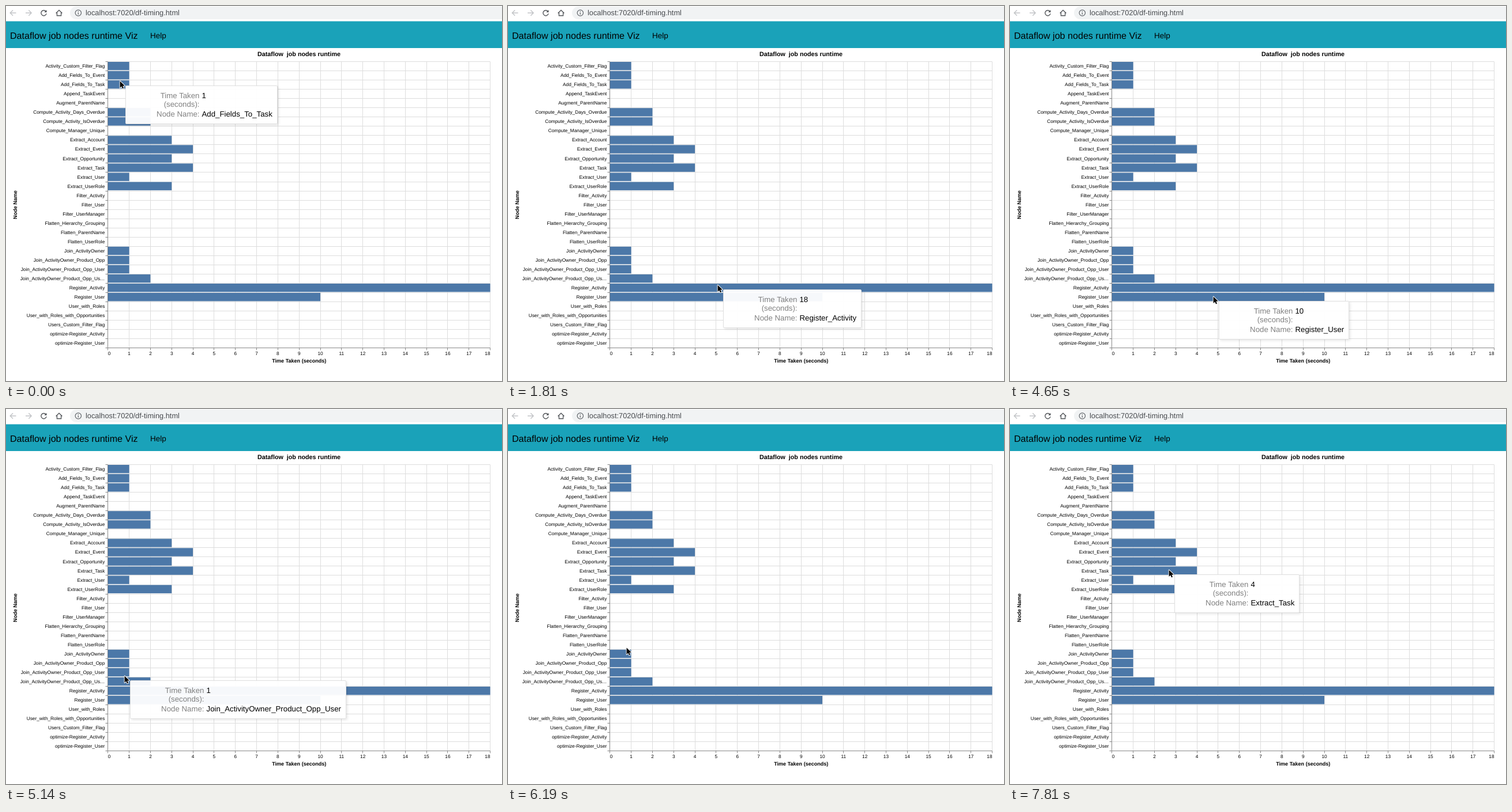
An HTML page for the animation above (8000 ms loop, 860x651 px).

```html
<!DOCTYPE html>
<html lang="en">
<head>
<meta charset="utf-8">
<title>Dataflow job nodes runtime Viz</title>
<style>
  html, body { margin: 0; width: 860px; height: 651px; overflow: hidden; background: #fff; }
  body { position: relative; font-family: "Liberation Sans", Arial, sans-serif; text-rendering: geometricPrecision; }
  svg { position: absolute; left: 0; top: 0; }
  text { white-space: pre; }
  .bold { font-weight: bold; }
  #tip {
    position: absolute; left: 0; top: 0; box-sizing: border-box; height: 67px;
    padding: 8.5px 8px 0; border: 1px solid #e0e0e0; border-radius: 2px;
    background: rgba(255, 255, 255, .95); box-shadow: 2px 2px 4px rgba(0, 0, 0, .1);
    display: grid; grid-template-columns: 119.5px auto; gap: 2.5px 4px;
    align-content: start; font-size: 13.25px; line-height: 15px; white-space: nowrap; color: #000;
  }
  .key { text-align: right; color: #808080; }
</style>
</head>
<body>
<svg id="page" width="860" height="651">
  <path d="M860 1H122a11 11 0 0 0 0 22H860z" fill="#f1f3f4"/>
  <g fill="none" stroke-width="1.4">
    <path d="M17.500 12H7.500M12 7.200L7.200 12L12 16.800M34 12H44M39.300 7.200L44.100 12L39.300 16.800" stroke="#c2c4c7"/>
    <path d="M69.200 9.200A4.700 4.700 0 1 0 70.100 13.200" stroke="#55585c"/>
    <path d="M70.500 6.800V11H66.300z" fill="#55585c"/>
    <path d="M86.600 12.400L92 7.200L97.400 12.400M88.400 11.200V16.800H95.600V11.200" stroke="#55585c"/>
    <circle cx="125.300" cy="12" r="5.200" stroke="#5f6368" stroke-width="1.200"/>
    <path d="M125.300 11.400V14.800M125.300 9V10.300" stroke="#5f6368" stroke-width="1.300"/>
  </g>
  <text x="138" y="16.300" font-size="12.800" fill="#484b4f">localhost:7020/df-timing.html</text>
  <rect y="26.500" width="860" height="46.500" fill="#1aa2b9"/>
  <text x="7" y="56.500" font-size="16.100">Dataflow job nodes runtime Viz</text>
  <text x="250" y="56" font-size="13.500">Help</text>
  <g id="chart"></g>
</svg>
<div id="tip">
  <span class="key">Time Taken<br>(seconds):</span><span id="secs"></span>
  <span class="key">Node Name:</span><span id="node"></span>
</div>
<svg id="cursor" width="14" height="18" overflow="visible">
  <path d="M1.600 1.500V13L4.300 10.500L6.100 14.400L8 13.600L6.300 9.700L9.900 9.500z"
        stroke="#fff" stroke-width="1.800" stroke-linejoin="round" paint-order="stroke"/>
</svg>
<script>
const $ = id => document.getElementById(id);
const LEFT = 176.8, TOP = 96.5, UNIT = 36.82, ROW = 16.04, LOOP = 8000, FADE = 210;

const rows = `Activity_Custom_Filter_Flag 1
Add_Fields_To_Event 1
Add_Fields_To_Task 1
Append_TaskEvent 0
Augment_ParentName 0
Compute_Activity_Days_Overdue 2
Compute_Activity_IsOverdue 2
Compute_Manager_Unique 0
Extract_Account 3
Extract_Event 4
Extract_Opportunity 3
Extract_Task 4
Extract_User 1
Extract_UserRole 3
Filter_Activity 0
Filter_User 0
Filter_UserManager 0
Flatten_Hierarchy_Grouping 0
Flatten_ParentName 0
Flatten_UserRole 0
Join_ActivityOwner 1
Join_ActivityOwner_Product_Opp 1
Join_ActivityOwner_Product_Opp_User 1
Join_ActivityOwner_Product_Opp_UserRole 2
Register_Activity 18
Register_User 10
User_with_Roles 0
User_with_Roles_with_Opportunities 0
Users_Custom_Filter_Flag 0
optimize-Register_Activity 0
optimize-Register_User 0`.split("\n").map(line => {
  const [name, value] = line.split(" ");
  return { name, value: +value };
});

const snap = v => Math.floor(v) + .5;
const right = LEFT + 18 * UNIT, bottom = TOP + rows.length * ROW;

function line(x1, y1, x2, y2, color) {
  return `<path d="M${snap(x1)} ${snap(y1)}L${snap(x2)} ${snap(y2)}" stroke="${color}"/>`;
}
function label(x, y, str, anchor, extra = 'font-size="8.27"') {
  return `<text x="${x}" y="${y}" text-anchor="${anchor}" ${extra}>${str}</text>`;
}

function drawChart() {
  let grid = "", bars = "", axes = "";
  for (let i = 0; i <= 18; i++) {
    const x = LEFT + i * UNIT;
    grid += line(x, TOP, x, bottom, "#ddd");
    axes += line(x, bottom, x, bottom + 4, "#888");
    axes += label(x, 606, i, i === 0 ? "start" : i === 18 ? "end" : "middle");
  }
  for (let i = 0; i <= rows.length; i++) {
    const y = TOP + i * ROW;
    grid += line(LEFT, y, right, y, "#ddd");
    axes += line(LEFT - 4, y, LEFT, y, "#888");
  }
  rows.forEach(({ name, value }, i) => {
    const y = TOP + i * ROW;
    if (value) bars += `<rect x="${LEFT}" y="${y + .5}" width="${value * UNIT}" height="14.4" fill="#4c78a8"/>`;
    axes += label(171.3, y + 10.6, name.length > 35 ? name.slice(0, 33) + "…" : name, "end");
  });
  axes += line(LEFT, TOP, LEFT, bottom, "#888") + line(LEFT, bottom, right, bottom, "#888");
  axes += label(508, 86.5, "Dataflow\u00a0 job nodes runtime", "middle", 'class="bold" font-size="10.75"');
  axes += label(508.3, 618.5, "Time Taken (seconds)", "middle", 'class="bold" font-size="9.05"');
  axes += label(0, 0, "Node Name", "middle", 'class="bold" font-size="9.05" transform="translate(19 345) rotate(-90)"');
  $("chart").innerHTML = grid + axes + bars;
}

// Pointer moves: first step, last step, evenly timed stops between them.
// A stop marked "off" has no tooltip even over a bar.
const moves = [
  [0, 90, "196,129 196,129,off"],
  [240, 820, "203,146 213,163 236,212 261,246 296,298 330,345 352,380 362,398"],
  [1000, 1720, "362,400 362,404 363,410 363,420 364,434 364,449 364,462 364,474 363,481 363,484 362,483"],
  [1810, 1810, "362,483"],
  [2760, 3030, "361,486 358,492 353,499 350,502"],
  [4650, 5060, "351,503 358,493 340,491 300,489 255,488 220,484"],
  [5140, 5400, "204,462 204,458 204,455 205,454"],
  [5670, 6190, "203,458 196,466 198,460 201,447 203,436 204,424 204,413"],
  [6360, 6500, "222,385 265,325 262,302"],
  [6830, 6980, "262,305 263,309 263,311"],
  [7370, 7810, "263,308 266,300 270,288 273,281 274,279 274,278"]
];

function barAt(x, y) {
  const i = Math.floor((y - TOP) / ROW), row = rows[i], dy = y - TOP - i * ROW;
  return row && row.value && x < LEFT + row.value * UNIT && dy >= .8 && dy <= 15.2 ? row : null;
}

// Each stop knows the hovered bar and how far its tooltip has faded in
let since = -FADE, shown = true;
const stops = moves.flatMap(([from, to, path]) => {
  const points = path.split(" ");
  return points.map((p, i) => {
    const [px, py, off] = p.split(",");
    const x = +px, y = +py;
    const t = Math.floor(from + (to - from) * i / Math.max(1, points.length - 1));
    const bar = off ? null : barAt(x + 1, y + 1);
    if (bar && !shown) since = t;
    shown = !!bar;
    return { t, x, y, bar, alpha: bar ? Math.min(1, (t - since + 60) / FADE) : 0 };
  });
});

let current;
function show(stop) {
  if (stop === current) return;
  current = stop;
  const { x, y, bar, alpha } = stop;
  $("cursor").style.transform = `translate(${x}px, ${y}px)`;
  $("tip").style.opacity = alpha;
  if (!bar) return;
  $("tip").style.transform = `translate(${x + 11}px, ${y + 9}px)`;
  $("secs").textContent = bar.value;
  $("node").textContent = bar.name;
}

drawChart();
show(stops[0]);
const start = performance.now();
function tick() {
  const t = (performance.now() - start) % LOOP;
  show(stops.findLast(s => s.t <= t) || stops[0]);
  requestAnimationFrame(tick);
}
requestAnimationFrame(tick);
</script>
</body>
</html>
```
